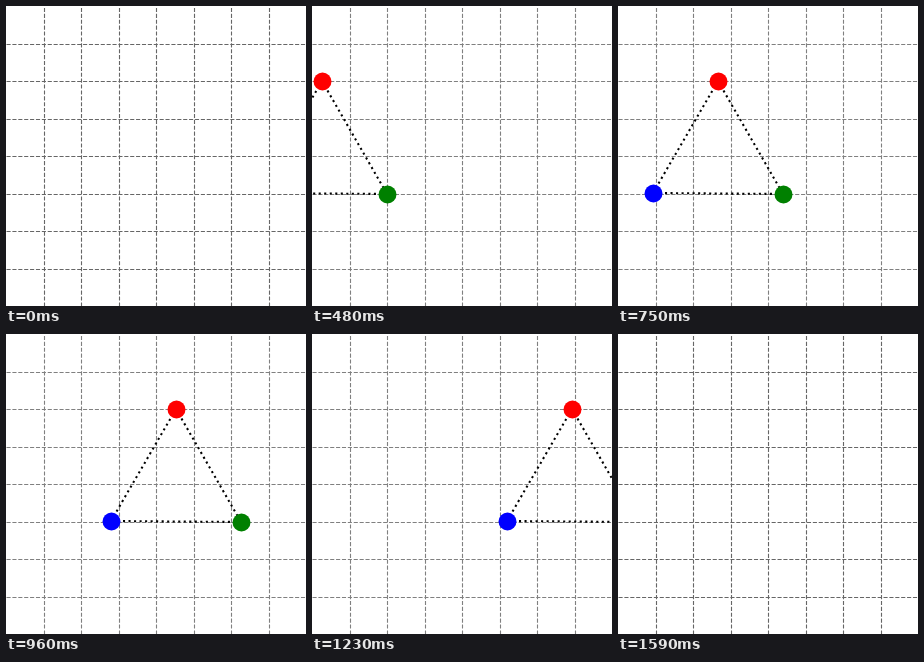
Recreate the animation shown at these times as an HTML page with a canvas. Size 300 px wide and 300 px high, loop 1.8 s.

```html
<!DOCTYPE html>
<html lang="en">
<head>
<meta charset="utf-8">
<title>Sliding triangle</title>
<style>
  html, body { margin: 0; width: 100%; height: 100%; overflow: hidden; background: #fff; }
  canvas { display: block; width: 300px; height: 300px; }
</style>
</head>
<body>
<canvas id="stage" width="300" height="300"></canvas>
<script>
const ctx = document.getElementById('stage').getContext('2d');
const SIZE = 300, LOOP = 1800, STEP = 30;
const CELL = 37.5;
const PX = 100 / 72; // pixels per point

// Corner positions at 750 ms
const corners = [
  { x: 100, y: 75, color: '#ff0000' },
  { x: 165, y: 188, color: '#008000' },
  { x: 35, y: 187, color: '#0000ff' }
];

function dashed(a, b, points, pattern) {
  ctx.lineWidth = points * PX;
  ctx.setLineDash(pattern.map(n => n * points * PX));
  ctx.beginPath();
  ctx.moveTo(...a);
  ctx.lineTo(...b);
  ctx.stroke();
}

function drawGrid(color) {
  ctx.strokeStyle = color;
  for (let i = 1; i < 8; i++) {
    const p = Math.round(i * CELL) + 0.5;
    dashed([0.5, p], [SIZE + 0.5, p], 0.8, [3.7, 1.6]);
    dashed([p, SIZE + 0.5], [p, 0.5], 0.8, [3.7, 1.6]);
  }
}

function drawTriangle(shift) {
  ctx.strokeStyle = '#000';
  corners.forEach((a, i) => {
    const b = corners[(i + 1) % corners.length];
    dashed([a.x + shift, a.y], [b.x + shift, b.y], 1.5, [1, 1.65]);
  });
  for (const { x, y, color } of corners) {
    ctx.fillStyle = color;
    ctx.beginPath();
    ctx.arc(x + shift + 0.5, y + 0.5, 9, 0, Math.PI * 2);
    ctx.fill();
  }
}

function draw(ms) {
  const t = Math.floor(ms / STEP) * STEP;
  const visible = t >= 240 && t < 1590;
  ctx.fillStyle = '#fff';
  ctx.fillRect(0, 0, SIZE, SIZE);
  drawGrid(visible ? '#808080' : '#666');
  if (visible) drawTriangle((t - 750) / 3);
}

const start = performance.now();
function tick() {
  draw((performance.now() - start) % LOOP);
  requestAnimationFrame(tick);
}
tick();
</script>
</body>
</html>
```
